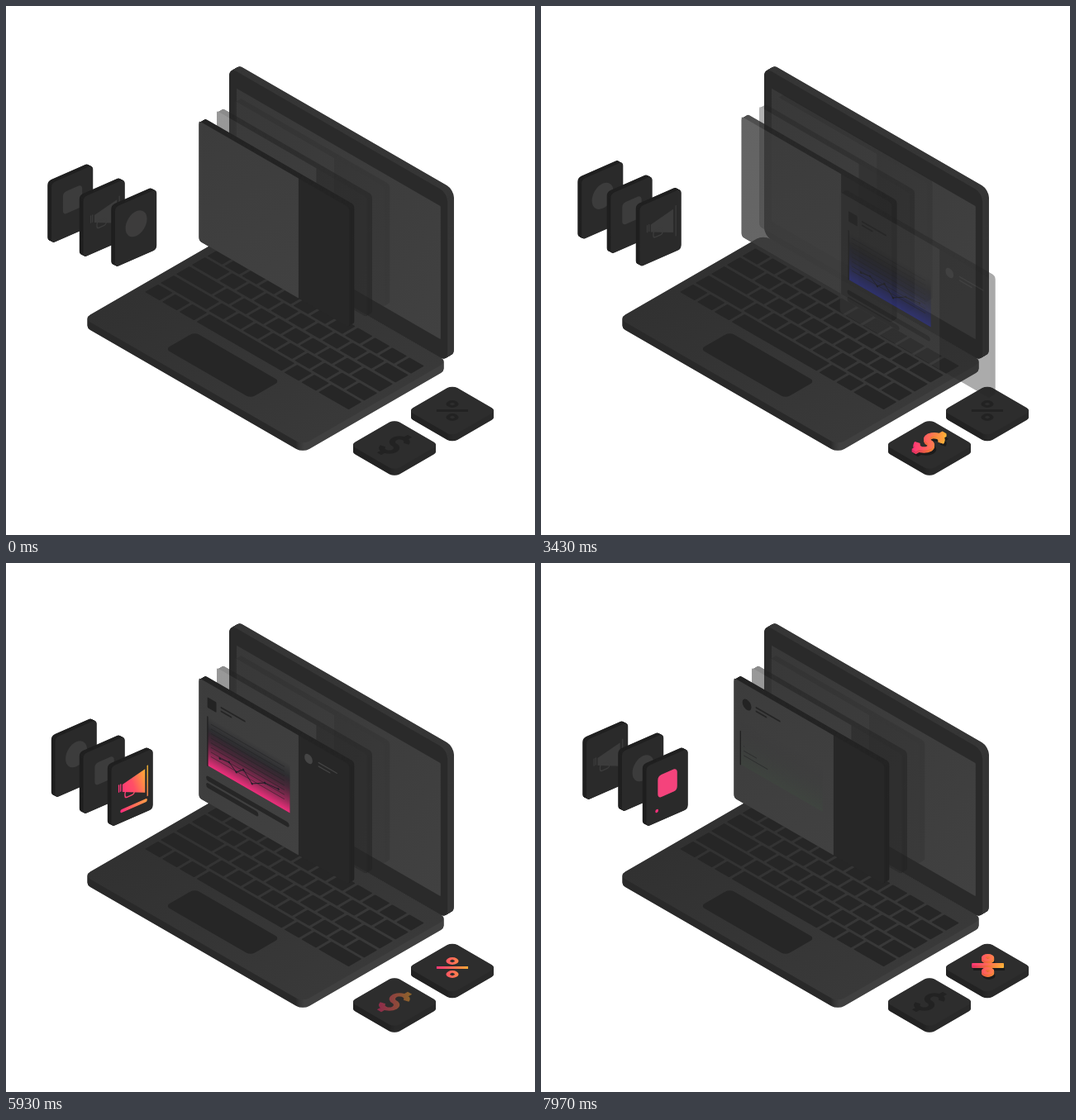
Write an HTML page with a canvas that moves like this. It is 640 px wide and 640 px high and loops after 8000 ms.

```html
<!DOCTYPE html>
<html lang="en">
<head>
<meta charset="utf-8">
<title>Isometric laptop</title>
<style>
html, body { margin: 0; width: 100%; height: 100%; overflow: hidden; background: #fff; }
canvas { display: block; width: 640px; height: 640px; }
</style>
</head>
<body>
<canvas id="stage" width="640" height="640"></canvas>
<script>
const LOOP = 8000;
const stage = document.getElementById('stage').getContext('2d');
const buffer = document.createElement('canvas');
buffer.width = buffer.height = 640;
const layer = buffer.getContext('2d');
let g = stage;

const PINK = '#ff2d7c', CORAL = '#ff6a58', ORANGE = '#ffb52f', INK = '#262626';

// Isometric planes: ground, upright facing left, upright facing right
const COS = Math.cos(Math.PI / 6);
const FLOOR = [COS, 0.5, -COS, 0.5];
const WALL = [COS, 0.5, 0, 1];
const SIDE = [COS, -0.38, 0, 1];

const clamp = x => Math.max(0, Math.min(1, x));
const ramp = (t, from, length) => clamp((t - from) / length);
const smooth = x => { x = clamp(x); return x * x * (3 - 2 * x); };
const out = x => 1 - (1 - x) * (1 - x);
const mix = (a, b, k) => a + (b - a) * k;

function on(plane, x, y, draw) {
  g.save();
  g.transform(...plane, x, y);
  draw();
  g.restore();
}
function blend(x0, y0, x1, y1, ...colors) {
  const fill = g.createLinearGradient(x0, y0, x1, y1);
  colors.forEach((c, i) => fill.addColorStop(i / (colors.length - 1), c));
  return fill;
}
function rect(fill, x, y, w, h, r = 0) {
  g.fillStyle = fill;
  g.beginPath();
  g.roundRect(x, y, w, h, r);
  g.fill();
}
function disc(fill, x, y, r) {
  g.fillStyle = fill;
  g.beginPath();
  g.arc(x, y, r, 0, Math.PI * 2);
  g.fill();
}
function line(color, width, x0, y0, x1, y1, k = 1) {
  if (k <= 0) return;
  g.strokeStyle = color;
  g.lineWidth = width;
  g.lineCap = 'round';
  g.beginPath();
  g.moveTo(x0, y0);
  g.lineTo(mix(x0, x1, k), mix(y0, y1, k));
  g.stroke();
}
// Rounded plate with a thickness of (dx, dy) on screen
function plate(plane, x, y, w, h, r, face, side, dx, dy) {
  const steps = Math.ceil(Math.hypot(dx, dy) * 2);
  for (let i = steps; i >= 0; i--) {
    const k = i / steps;
    on(plane, x + dx * k, y + dy * k, () => rect(i ? side() : face(), 0, 0, w, h, r));
  }
}
// Draws a group as one sheet with a shared opacity
function faded(alpha, draw) {
  if (alpha <= 0.01) return;
  if (alpha >= 0.99) return draw();
  layer.clearRect(0, 0, 640, 640);
  g = layer;
  draw();
  g = stage;
  g.globalAlpha = alpha;
  g.drawImage(buffer, 0, 0);
  g.globalAlpha = 1;
}

function keyRow(r) {
  if (r === 4) return [1, 1, 1, 5.1, 1, 1, 1.9];
  const row = [1 + 0.6 * r];
  let left = 12 - row[0];
  for (; left >= 2; left--) row.push(1);
  return [...row, left];
}
function keyboard() {
  const unit = 24, pitch = 21.8, gap = 3.4;
  for (let r = 0; r < 5; r++) {
    let x = 9;
    for (const w of keyRow(r)) {
      rect(INK, x + gap / 2, 20 + r * pitch + gap / 2, w * unit - gap, pitch - gap, 1);
      x += w * unit;
    }
  }
}

function laptop() {
  plate(FLOOR, 269, 277, 306, 202, 9,
    () => blend(0, 202, 306, 202, '#313131', '#393939'),
    () => blend(296, 0, 304, 0, '#292929', '#404040'), 0, 9.5);
  plate(WALL, 270, 74, 305, 204, 10, () => '#2a2a2a', () => '#363636', 7.8, -4.5);
  on(WALL, 270, 74, () => rect(blend(10, 20, 295, 180, '#383838', '#414141'), 10.4, 20.5, 285, 161, 1));
  on(FLOOR, 269, 277, () => {
    keyboard();
    rect(INK, 94, 141, 119, 41, 6);
  });
}

const TINTS = ['60,68,222', '242,48,126', '76,175,80'];
const TREND = [[17, 42], [30, 40], [40, 47], [50, 39], [62, 50], [80, 40], [99, 38]];

function chart(n, p) {
  const w = 115, h = 59, grow = ramp(p, 250, 1300);
  const shade = (rgb, ...alphas) =>
    blend(0, 0, 0, h, ...alphas.map(a => 'rgba(' + rgb + ',' + a * grow + ')'));
  rect(shade('33,33,38', 0, 0.75, 0.9, 0.9), 0, 0, w, h);
  rect(shade(TINTS[n], 0, 0, 0.16, 0.5, 0.98), 0, 0, w, h);
  for (let i = 0; i < 8; i++) {
    const y = 46 - i * 5.6;
    line('rgba(34,34,36,.6)', 1, 5, y, 107, y, out(ramp(p, 180 + i * 70, 800)));
  }
  line('#202020', 1.5, 0, h, 0, 0, ramp(p, 50, 400));

  const k = ramp(p, 1100, 750) * (TREND.length - 1);
  if (k <= 0) return;
  TREND.forEach(([x, y], i) => {
    if (i > k) return;
    disc('#1f1f28', x, y, 1.3);
    if (TREND[i + 1]) line('#1f1f28', 1, x, y, ...TREND[i + 1], clamp(k - i));
  });
}

function content(n, p) {
  if (p <= 0) return;
  const size = 12.5 * mix(1.8, 1, ramp(p, 0, 300));
  if (n === 2) disc('#232323', 18, 23.5, size / 2);
  else rect('#232323', 18 - size / 2, 23.5 - size / 2, size, size, 1);
  line('#252525', 1.8, 31, 20.5, 64, 20.5, ramp(p, 50, 220));
  line('#252525', 1.8, 31, 25, 45, 25, ramp(p, 100, 200));
  on([1, 0, 0, 1], 12 - 3 * (1 - ramp(p, 320, 200)), 41, () => chart(n, p));
  line(INK, 6, 13, 115.5, 123, 115.5, smooth(ramp(p, 1060, 750)));
  line(INK, 6, 13, 124, 80, 124, smooth(ramp(p, 1100, 600)));
  disc('#454545', 153, 21.5, 5.6 * out(ramp(p, 1700, 200)));
  line('#454545', 1.3, 167, 19, 200, 19, ramp(p, 1820, 400));
  line('#454545', 1.3, 167, 23.5, 184, 23.5, ramp(p, 1850, 300));
}

function panel(dx, dy, alpha, n, p) {
  const x = 233.5 + dx, y = 139 + dy, w = 210, h = 145, split = 139;
  faded(alpha, () => {
    plate(WALL, x, y, w, h, 4, () => '#272727', () => '#242424', 6, -3.5);
    on(WALL, x, y, () => {
      rect(blend(0, 0, split, h, '#3c3c3c', '#414141'), 0, 0, split, h, [2, 0, 0, 4]);
      content(n, p);
    });
  });
}

function megaphone(fill) {
  g.fillStyle = fill;
  g.beginPath();
  g.moveTo(15.5, 27.5);
  g.lineTo(47, 20.5);
  g.lineTo(47, 49);
  g.lineTo(15.5, 36.5);
  g.fill();
  line(fill, 1.5, 50.5, 18, 50.5, 54);
  line(fill, 1.5, 10.5, 26.5, 10.5, 34.5);
  line(fill, 1.5, 13, 26.5, 13, 34.5);
  g.strokeStyle = fill;
  g.lineWidth = 1.5;
  g.beginPath();
  g.roundRect(19, 37, 13, 8, 3);
  g.stroke();
}
const ICONS = [
  c => disc(c || '#ff5f60', 29.5, 31, 15),
  c => megaphone(c || blend(10, 40, 50, 25, PINK, '#ff4f66', ORANGE)),
  c => rect(c || '#f5437c', 16, 17.5, 27, 27, 5)
];

function card(kind, x, y, glow = 0, bar = 0, alpha = 1) {
  if (kind === 0) { x += 4.5; y -= 3; }
  faded(alpha, () => {
    plate(SIDE, x + 5, y + 24.5, 58, 73, 5, () => '#2a2a2a', () => '#202020', -4.7, -2.5);
    on(SIDE, x + 5, y + 24.5, () => {
      ICONS[kind]('#3c3c3c');
      g.globalAlpha = glow;
      if (glow > 0) ICONS[kind]();
      g.globalAlpha = 1;
      line(blend(14, 0, 48, 0, PINK, CORAL, '#ff9a48'), 4, 14.5, 59, 48, 59, bar);
    });
  });
}

function dollar() {
  const r = 7.2;
  g.lineWidth = 6;
  g.beginPath();
  g.arc(0, -r, r, -0.3, Math.PI / 2, true);
  g.arc(0, r, r, -Math.PI / 2, Math.PI - 0.3);
  for (const s of [-1, 1]) {
    g.moveTo(0, 2 * r * s);
    g.lineTo(0, 21.5 * s);
  }
  g.stroke();
}
function percent() {
  g.lineWidth = 4;
  g.beginPath();
  g.moveTo(-11, 11);
  g.lineTo(11, -11);
  for (const s of [-8, 8]) {
    g.moveTo(s + 4.2, s);
    g.arc(s, s, 4.2, 0, Math.PI * 2);
  }
  g.stroke();
}

// Token on the ground whose sign lights up, rises, sways and goes out
function token(sign, x, y, t, start, end) {
  const side = 61.8;
  plate(FLOOR, x, y - side / 2, side, side, 7, () => '#2d2d2d',
    () => blend(side - 8, 0, side - 2, 0, '#222', '#292929'), 0, 8);
  const glow = ramp(t, start, 550) * (1 - ramp(t, end, 450));
  const lift = smooth(ramp(t, start + 1080, 600)) * (1 - smooth(ramp(t, end - 700, 600)));
  const sway = (-0.75 - 1.75 * Math.cos((t - 2830) / 2150 * Math.PI * 2)) * lift;
  const stamp = (dx, dy, ...colors) => on(FLOOR, x + dx, y + dy, () => {
    g.lineCap = 'butt';
    g.strokeStyle = blend(-13, 13, 13, -13, ...colors);
    sign();
  });
  stamp(0, 0, '#222', '#222');
  if (glow <= 0) return;
  g.globalAlpha = glow;
  if (lift > 0) {
    stamp(2 * lift, 2 * lift, '#1b1b1b', '#1b1b1b');
    for (let h = 1; h < 4; h += 0.5) stamp(sway, -h * lift, '#e0246a', '#f0703a', '#ffc13c');
  }
  stamp(sway, -4.2 * lift, PINK, CORAL, ORANGE);
  g.globalAlpha = 1;
}

// Cycle number, time inside its content and time inside the hand-over
function timing(t) {
  const n = t < 5500 ? 0 : 1;
  const shift = t < 3385 ? t - 3040 : n ? t - 6750 : t - 2900;
  if (shift >= 750) return { n: n + 1, phase: shift - 900, shift: -1 };
  return { n, phase: n ? t - 3800 : t - 20, shift };
}

function panels({ n, phase, shift }) {
  const q = smooth(ramp(shift, 350, 330));
  const alphas = [1, 0.52, 0.2, 0];
  for (let d = 3; d >= 1; d--) {
    const alpha = d === 3 ? 0.2 * clamp(q * 4) : mix(alphas[d], alphas[d - 1], q);
    panel(21.5 * (d - q), -12.2 * (d - q), alpha, n, 0);
  }
  const u = ramp(shift, 335, 250), slide = Math.pow(u, 1.3);
  panel(176 * slide, 118 * slide, 1 - u * u, n, phase);
}

// Front, middle and back place, then the point of entry
const SLOTS = [[122.5, 222], [88.5, 207], [50, 190], [6, 184]];

function cards({ n, phase, shift }) {
  const move = out(ramp(shift, 300, 450));
  const exit = smooth(shift / 550);
  const glow = ramp(phase, -20, 200), bar = smooth(ramp(phase, 290, 720));
  const place = i => [0, 1].map(a => mix(SLOTS[i][a], SLOTS[i - 1][a], move));
  if (move > 0) card(n % 3, ...place(3), 0, 0, clamp(move * 2.2));
  for (const i of [2, 1]) card((n + i) % 3, ...place(i));
  card(n % 3, SLOTS[0][0], SLOTS[0][1] - 100 * exit, glow, bar, 1 - exit);
}

function draw(t) {
  const now = timing(t);
  g.fillStyle = '#fff';
  g.fillRect(0, 0, 640, 640);
  laptop();
  token(percent, 540, 489.5, t, 4950, LOOP * 2);
  token(dollar, 470, 531, t, 30, 5700);
  panels(now);
  cards(now);
}

const start = performance.now();
function tick() {
  draw((performance.now() - start) % LOOP);
  requestAnimationFrame(tick);
}
tick();
</script>
</body>
</html>
```
